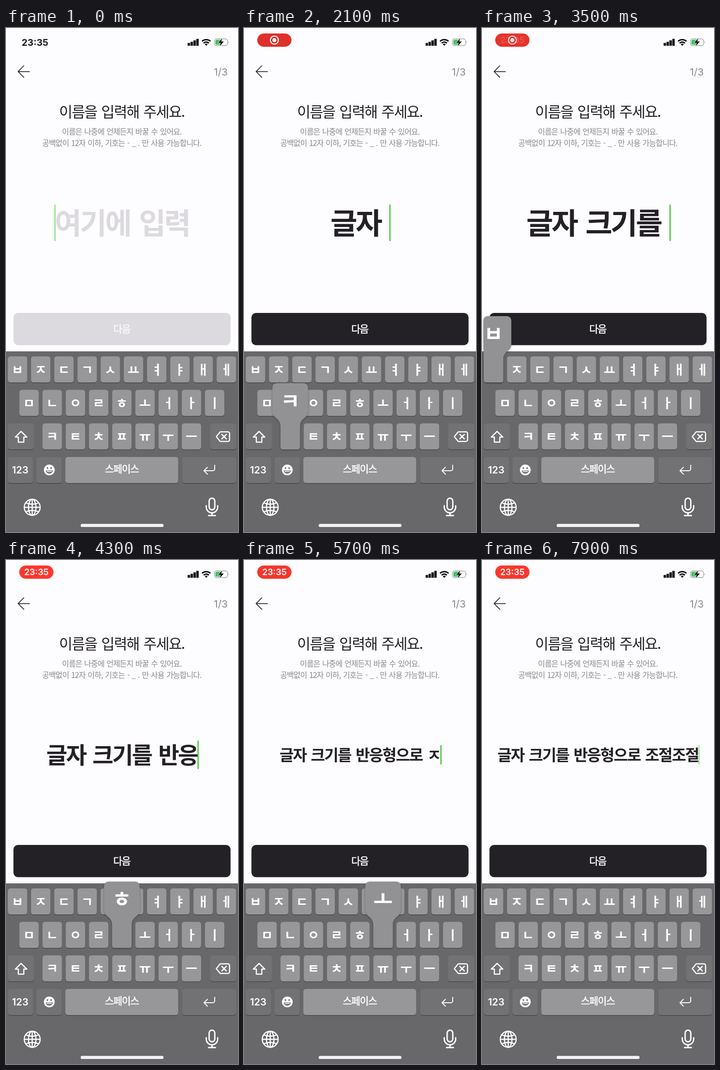
These frames come from a looping animation (508x1102 px, 8 s). An HTML page:

```html
<!DOCTYPE html>
<html lang="ko">
<head>
<meta charset="utf-8">
<title>이름 입력</title>
<style>
  html, body { margin: 0; width: 100%; height: 100%; overflow: hidden; background: #fdfcfe; }
  svg { display: block; width: 100vw; height: 100vh; }
  text { white-space: pre; text-anchor: middle; }
  .ko { font-family: "Noto Sans CJK KR", "Noto Sans CJK", sans-serif; letter-spacing: -.058em; word-spacing: .075em; }
  .num { font-family: Inter, Roboto, sans-serif; }
  .medium { stroke: currentColor; stroke-width: .6; }
  .jamo { font-family: "Noto Sans CJK KR", "Noto Sans CJK", sans-serif; font-weight: 700; fill: #fff; }
  .line { fill: none; stroke: #fff; stroke-linecap: round; stroke-linejoin: round; }
</style>
</head>
<body>
<svg viewBox="0 0 508 1102" preserveAspectRatio="none">
  <rect width="508" height="1102" fill="#fdfcfe"/>

  <!-- status bar -->
  <text id="clock" class="num" x="63.5" y="38.5" font-size="20.3" font-weight="700" fill="#1d1b1f">23:35</text>
  <g id="pill">
    <rect id="pillBack" x="29" y="12" width="75" height="29" rx="14.5"/>
    <g id="record">
      <circle cx="66.5" cy="26.5" r="8.8" fill="none" stroke="#fff" stroke-width="2.2"/>
      <circle cx="66.5" cy="26.5" r="4.4" fill="#fff"/>
    </g>
    <text id="pillClock" class="num" x="66.5" y="33.3" font-size="19" font-weight="600" fill="#fff">23:35</text>
  </g>
  <path d="M398 33h4.7v5.5h-4.7zM404.3 30.5h4.7v8h-4.7zM410.7 27.3h4.7v11.2h-4.7zM417 24h4.7v14.5h-4.7z"
        fill="#0c0b0d" stroke="#0c0b0d" stroke-width=".6" stroke-linejoin="round"/>
  <g fill="none" stroke="#0c0b0d" stroke-width="3">
    <path d="M429.3 29.2a13.2 13.2 0 0 1 18.4 0M432.7 33.1a8.4 8.4 0 0 1 11.6 0"/>
    <path d="M438.5 39l-3.4-3.4a4.8 4.8 0 0 1 6.8 0z" fill="#0c0b0d" stroke="none"/>
  </g>
  <rect x="456.5" y="23.7" width="28.6" height="14.8" rx="4.5" fill="none" stroke="#a3a2a5" stroke-width="1.4"/>
  <path d="M487 28.5q2.2 2.6 0 5.2z" fill="#a3a2a5"/>
  <path d="M461.5 25.7H471V36.5H461.5a3 3 0 0 1-3-3v-4.8a3 3 0 0 1 3-3z" fill="#35c65a"/>
  <path d="M473.5 22.5l-9 10h5.6l-2.2 7.3 9-10.2h-5.6z" fill="#0c0b0d" stroke="#fdfcfe" stroke-width="1.6" paint-order="stroke"/>

  <!-- page -->
  <path d="M52 95.3H26.5M39.5 82L26.5 95.3 39.5 108.4" fill="none" stroke="#242126" stroke-width="1.7"/>
  <text class="num" x="485.5" y="103.5" font-size="22" fill="#8b898d" style="text-anchor:end">1/3</text>
  <text class="ko" x="253.5" y="195.3" font-size="32" fill="#242126">이름을 입력해 주세요.</text>
  <g font-size="16.9" fill="#8a888c">
    <text class="ko" x="253.5" y="233">이름은 나중에 언제든지 바꿀 수 있어요.</text>
    <text class="ko" x="253.5" y="257.6">공백없이 12자 이하, 기호는 - _ . 만 사용 가능합니다.</text>
  </g>
  <text id="field" class="ko" x="254" font-weight="700"/>
  <rect id="cursor" width="2.6" rx="1.2" fill="#3fc52f"/>
  <rect id="next" x="16.3" y="623" width="475.4" height="70.5" rx="10"/>
  <text id="nextText" class="ko medium" x="253.5" y="666.2" font-size="21.5" fill="currentColor">다음</text>

  <!-- keyboard -->
  <rect y="707" width="508" height="395" fill="#686769"/>
  <g id="keys"></g>
  <text class="num" x="31" y="974" font-size="21.5" font-weight="600" fill="#fff">123</text>
  <text class="ko medium" x="253.5" y="972" font-size="21.5" fill="#fff" color="#fff">스페이스</text>
  <g class="line" stroke-width="2.5">
    <path d="M33 882L45.5 894.5H39V905.5H27V894.5H20.5z"/>
    <path d="M469 883H486a3.5 3.5 0 0 1 3.5 3.5V900.5a3.5 3.5 0 0 1-3.5 3.5H469L460.5 893.5zM472.5 888.5l10 10M482.5 888.5l-10 10"/>
    <path d="M457 956V964a4 4 0 0 1-4 4H433.5M441 960.5L433.5 968 441 975.5" stroke-width="2"/>
  </g>
  <circle cx="94.8" cy="966.3" r="11.8" fill="#fff"/>
  <g fill="#727173">
    <ellipse cx="90.8" cy="962.3" rx="1.6" ry="2.3"/>
    <ellipse cx="98.8" cy="962.3" rx="1.6" ry="2.3"/>
    <path d="M87 967.5h15.6a7.8 7 0 0 1-15.6 0z"/>
    <path d="M89 968.8h11.6l-.8 1.8h-10z" fill="#fff"/>
  </g>
  <g class="line" stroke-width="2.5">
    <circle cx="57.4" cy="1048" r="17.4"/>
    <ellipse cx="57.4" cy="1048" rx="8.3" ry="17.4"/>
    <path d="M57.4 1030.6V1065.4M40 1048H74.8M44 1038.3q13.4 6 26.8 0M44 1057.7q13.4-6 26.8 0"/>
  </g>
  <g class="line" stroke-width="3">
    <rect x="444.8" y="1028" width="12.4" height="25.5" rx="6.2"/>
    <path d="M438.5 1044.5V1047.5a12.5 12.5 0 0 0 25 0V1044.5M451 1060V1066M443.5 1066H458.5"/>
  </g>
  <rect x="163.5" y="1084.3" width="181.5" height="6.8" rx="3.4" fill="#f3f2f4"/>

  <g id="popup" style="filter:drop-shadow(0 1px 2px rgba(0,0,0,.3))">
    <path id="bubble" fill="#929194"/>
    <text id="bubbleText" class="jamo" font-size="46"/>
  </g>
</svg>
<script>
const $ = id => document.getElementById(id);
const set = (el, attrs) => { for (const k in attrs) el.setAttribute(k, attrs[k]); };
const clamp = x => Math.max(0, Math.min(1, x));
const LOOP = 8000, KEY_W = 42.5, KEY_H = 57;
const KEY = '#979699', DARK = '#727173';

// keyboard layout
const spots = {};
function add(tag, attrs, label = '') {
  const el = document.createElementNS('http://www.w3.org/2000/svg', tag);
  set(el, attrs);
  el.textContent = label;
  return $('keys').appendChild(el);
}
function keycap(x, y, width, fill) {
  const box = { x, width, height: KEY_H, rx: 5.5 };
  add('rect', { ...box, y: y + 1.5, fill: '#48474a' });
  return add('rect', { ...box, y, fill });
}
[['ㅂㅈㄷㄱㅅㅛㅕㅑㅐㅔ', 4, 718], ['ㅁㄴㅇㄹㅎㅗㅓㅏㅣ', 29.2, 791.3], ['ㅋㅌㅊㅍㅠㅜㅡ', 80, 864.6]]
  .forEach(([row, left, y]) => [...row].forEach((k, i) => {
    const x = left + i * 50.8;
    spots[k] = { x, y };
    keycap(x, y, KEY_W, KEY);
    add('text', { x: x + KEY_W / 2, y: y + 39.5, class: 'jamo', 'font-size': 28 }, k);
  }));
[[4, 864.6, 57], [447, 864.6, 57], [4, 938, 55], [67, 938, 55.5], [385.5, 938, 118.5]]
  .forEach(([x, y, w]) => keycap(x, y, w, DARK));
const space = keycap(130, 938, 247, KEY);

// Hangul composition
const LEAD = 'ㄱㄲㄴㄷㄸㄹㅁㅂㅃㅅㅆㅇㅈㅉㅊㅋㅌㅍㅎ';
const VOWEL = 'ㅏㅐㅑㅒㅓㅔㅕㅖㅗㅘㅙㅚㅛㅜㅝㅞㅟㅠㅡㅢㅣ';
const TAIL = ' ㄱㄲㄳㄴㄵㄶㄷㄹㄺㄻㄼㄽㄾㄿㅀㅁㅂㅄㅅㅆㅇㅈㅊㅋㅌㅍㅎ';
const syllable = (lead, v) => String.fromCharCode(0xAC00 + (LEAD.indexOf(lead) * 21 + v) * 28);
function compose(text, key) {
  if (!text || key === ' ') return text + key;
  const last = text.at(-1), head = text.slice(0, -1);
  const code = last.charCodeAt(0), whole = code >= 0xAC00;
  const tail = whole ? (code - 0xAC00) % 28 : 0;
  const v = VOWEL.indexOf(key);
  if (v >= 0) {
    if (tail) return head + String.fromCharCode(code - tail) + syllable(TAIL[tail], v);
    if (LEAD.includes(last)) return head + syllable(last, v);
  } else if (whole && !tail) {
    return head + String.fromCharCode(code + TAIL.indexOf(key));
  }
  return text + key;
}

// key presses: a character is committed when its key is released
const typed = 'ㄱㅡㄹㅈㅏ ㅋㅡㄱㅣㄹㅡㄹ ㅂㅏㄴㅇㅡㅇㅎㅕㅇㅇㅡㄹㅗ ㅈㅗㅈㅓㄹㅈㅗㅈㅓㄹ';
const downs = [980, 1110, 1250, 1470, 1680, 1880, 2060, 2250, 2440, 2610, 2770, 2880, 3080, 3270, 3470,
  3620, 3740, 3860, 3990, 4130, 4270, 4430, 4590, 4750, 4910, 5070, 5220, 5370, 5530, 5680,
  5850, 6020, 6180, 6330, 6450, 6570, 6680, 6880];
let text = '';
const presses = downs.map((down, i) => {
  const hold = i === 1 ? 80 : 135;
  const up = Math.min(down + hold, (downs[i + 1] ?? LOOP) - 5);
  text = compose(text, typed[i]);
  return { key: typed[i], down, up, text };
});

function showPopup(key) {
  const spot = spots[key];
  $('popup').style.display = spot ? '' : 'none';
  if (!spot) return;
  const { x, y } = spot, r = x + KEY_W, b = y + KEY_H;
  const L = Math.max(3, x - 17.7), R = r + 17.7, t = y - 88, s = y - 27;
  set($('bubble'), { d: `M${L + 11} ${t}H${R - 11}Q${R} ${t} ${R} ${t + 11}V${s}
    C${R} ${s + 17} ${r} ${s + 14} ${r} ${s + 34}V${b - 5}Q${r} ${b} ${r - 5} ${b}
    H${x + 5}Q${x} ${b} ${x} ${b - 5}V${s + 34}C${x} ${s + 14} ${L} ${s + 17} ${L} ${s}
    V${t + 11}Q${L} ${t} ${L + 11} ${t}Z` });
  set($('bubbleText'), { x: x + KEY_W / 2, y: y - 33 });
  $('bubbleText').textContent = key;
}

function showField(value, t) {
  const n = value.length, size = n <= 8 ? 64 : n <= 11 ? 50 : 34;
  const field = $('field'), label = value || '여기에 입력';
  if (field.textContent !== label) field.textContent = label;
  set(field, { 'font-size': size, y: 426 + size * .38, fill: value ? '#242126' : '#dcdade' });
  const half = field.getComputedTextLength() / 2, h = size * 1.25;
  const blink = t < 980 ? Math.max(clamp(.55 - t / 200), clamp((t - 500) / 200)) : clamp((7990 - t) / 200);
  set($('cursor'), { x: 254 + (value ? half - .4 : -half - .6), y: 426 - h / 2, height: h, opacity: blink });
  set($('next'), { fill: value ? '#242126' : '#dcdade' });
  $('nextText').style.color = value ? '#fff' : '#f8f7f9';
}

// recording pill glow: [time, brightness]
const glow = [[0, 1], [1300, .25], [2900, 0], [4300, 1], [5700, .8], [6700, .45], [7900, .95], [LOOP, 1]];
function showStatus(t) {
  const i = glow.findIndex(g => g[0] > t), [t0, a] = glow[i - 1], [t1, b] = glow[i];
  const k = a + (b - a) * (.5 - Math.cos(Math.PI * (t - t0) / (t1 - t0)) / 2);
  const on = clamp((t - 50) / 150), time = clamp((t - 3450) / 300);
  set($('clock'), { opacity: 1 - on });
  set($('pill'), { opacity: on });
  set($('pillBack'), { fill: `rgb(${217 + 36 * k},${49 + 6 * k},${43 + 3 * k})` });
  set($('record'), { opacity: 1 - time });
  set($('pillClock'), { opacity: time });
}

function draw(t) {
  const now = presses.find(p => t >= p.down && t < p.up);
  const done = presses.filter(p => t >= p.up).at(-1);
  showStatus(t);
  showField(done ? done.text : '', t);
  showPopup(now && now.key);
  set(space, { fill: now && now.key === ' ' ? DARK : KEY });
}

const start = performance.now();
function tick() {
  draw((performance.now() - start) % LOOP);
  requestAnimationFrame(tick);
}
tick();
</script>
</body>
</html>
```
